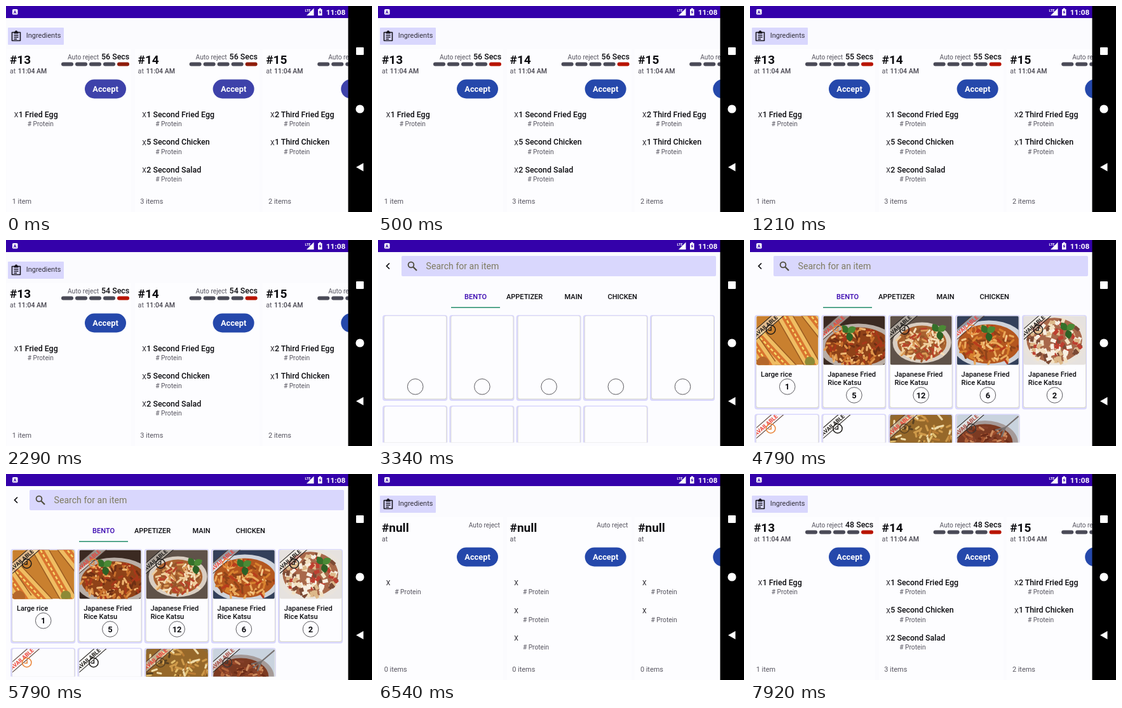
Write an HTML page that moves like this. It is 576 by 324 pixels and loops after 8000 ms.

```html
<!DOCTYPE html>
<html lang="en">
<head>
<meta charset="utf-8">
<title>Kitchen orders</title>
<style>
html, body { margin: 0; width: 100%; height: 100%; overflow: hidden; background: #000; }
svg { display: block; width: 100vw; height: 100vh; font-family: Roboto, "Open Sans", sans-serif; }
text { white-space: pre; }
</style>
</head>
<body>
<svg id="stage" viewBox="0 0 576 324" preserveAspectRatio="none"></svg>
<script>
const LOOP = 8000, OPEN = 3340, LOADED = 3690, BACK = 6540, DATA = 6600;
const BAR_ON = 3495, BAR_OFF = 4130;
const INK = '#0b0b0f', GREY = '#56545f', LILAC = '#d9d7fd';

const text = (x, y, s, size, weight = 400, fill = INK, extra = '') =>
  `<text x="${x}" y="${y}" font-size="${size}" font-weight="${weight}" fill="${fill}" ${extra}>${s}</text>`;
const rect = (x, y, w, h, fill, r = 0, extra = '') =>
  `<rect x="${x}" y="${y}" width="${w}" height="${h}" rx="${r}" fill="${fill}" ${extra}/>`;
const path = (d, fill, extra = '') => `<path d="${d}" fill="${fill}" ${extra}/>`;
const circle = (x, y, r, fill, extra = '') => `<circle cx="${x}" cy="${y}" r="${r}" fill="${fill}" ${extra}/>`;
const stroke = (d, color, w, extra = '') =>
  path(d, 'none', `stroke="${color}" stroke-width="${w}" ${extra}`);
const group = (s, attrs = '') => `<g ${attrs}>${s}</g>`;
const mid = 'text-anchor="middle"';

function randomizer(seed) {
  return () => (seed = (seed * 16807) % 2147483647) / 2147483647;
}

// ---- system bars
function chrome() {
  return rect(0, 0, 539, 19, '#3401aa') + rect(538.5, 0, 37.5, 324, '#000') +
    rect(10, 5, 8.5, 8.5, '#fff', 1.5) + text(14.2, 12, 'A', 7, 700, '#3401aa', mid) +
    text(470.5, 9, 'LTE', 5.5, 700, '#fff') + path('M473 15L484.500 3.500V15Z', '#fff') +
    path('M491 5H492.700V3.500H495.800V5H497.500V15H491Z', '#fff') +
    path('M495 6L492.300 10.300H494L493.500 13.500L496.200 9.200H494.500Z', '#3401aa') +
    text(503.8, 14, '11:08', 11.8, 700, '#fff') +
    rect(551, 65, 12, 12, '#fff', 1) + circle(557, 162, 6.6, '#fff') +
    path('M551 253.500L562.500 247V260Z', '#fff');
}

// ---- orders screen
const orders = [
  { id: 13, items: ['1 Fried Egg'] },
  { id: 14, items: ['1 Second Fried Egg', '5 Second Chicken', '2 Second Salad'] },
  { id: 15, items: ['2 Third Fried Egg', '1 Third Chicken'], shift: 7 }
];

function order(o, i, ready) {
  const n = o.items.length;
  let s = rect(1, 68, 196, 256, '#fdfdff');
  s += text(6, 90.5, ready ? '#' + o.id : '#null', 19, 700);
  s += text(6, 106, 'at', 10.7, 400, GREY);
  if (ready) {
    s += text(18.8, 106, '11:04 AM', 10.5, 500, '#44424c');
    s += text(97 + (o.shift || 0), 84, 'Auto reject', 10.2, 400, GREY);
    s += text(150 + (o.shift || 0), 83.5, '', 12.4, 500, INK, 'class="secs"');
    for (let k = 0; k < 5; k++)
      s += rect(87 + 22 * k, 88.5, 19, 6, k < 4 ? '#4a4a57' : '#b81400', 3, k < 4 ? '' : 'class="last"');
  } else {
    s += text(142.7, 84, 'Auto reject', 10.2, 400, GREY);
  }
  s += rect(124, 115.5, 65, 30, '#2548ab', 15, 'class="accept"');
  s += text(156.5, 135.3, 'Accept', 12.8, 700, '#fff', mid);
  o.items.forEach((item, k) => {
    const y = 174.5 + 43.5 * k;
    s += text(12.7, y + .5, 'X', 10.5, 400, '#25232b');
    if (ready) s += text(19.7, y, item, 12.4, 500);
    s += text(ready ? 33.7 : 26.3, y + 14.5, '# Protein', 10.2, 400, GREY);
  });
  s += text(9.7, 311, ready ? `${n} item${n > 1 ? 's' : ''}` : '0 items', 10.9, 400, GREY);
  return group(s, `transform="translate(${201.6 * i} 0)"`);
}

function ingredients() {
  const lines = 'M12.500 46H19.500M12.500 49H19.500M12.500 52H17';
  return rect(3, 34, 88, 27, LILAC, 1) +
    stroke('M9.500 41.500H22.500V54.500H9.500Z', '#19171f', 1.6, 'stroke-linejoin="round"') +
    path('M12.500 40.500H14A2 2 0 0 1 18 40.500H19.500V43.500H12.500Z', '#19171f') +
    stroke(lines, '#19171f', 1.3) + text(31.7, 50.3, 'Ingredients', 11, 400, '#35323c');
}

const ordersScreen = ready =>
  rect(0, 19, 539, 305, '#fbfbfe') + ingredients() + orders.map((o, i) => order(o, i, ready)).join('');

// ---- dishes: flat impressions made of strokes inside a plate
const RED = '#ee4038', BLACK = '#1c1a18', AMBER = '#e98235';
const fried = 'Japanese Fried|Rice Katsu';
const dishes = [
  { name: 'Large rice', n: 1, bg: '#c9802f', kind: 'buns', tag: BLACK, clock: BLACK },
  { name: fried, n: 5, bg: '#3b2a22', plate: [55, 48, 62, 36, '#b9aea6'], fill: '#8f4218', tag: RED, clock: AMBER,
    hues: ['#e0964a', '#c96f2b', '#efb672', '#a8381a', '#6f2f14'], leaf: [39, 26] },
  { name: fried, n: 12, bg: '#5f5249', plate: [50, 42, 46, 32, '#d9cec2'], fill: '#a9622f', tag: BLACK, clock: BLACK,
    hues: ['#efcd9b', '#d99a56', '#f5dfbb', '#b8442a', '#94552b'], leaf: [76, 24] },
  { name: fried, n: 6, bg: '#33405a', plate: [50, 44, 58, 37, '#cfd3da'], fill: '#b4571f', tag: RED, clock: AMBER,
    hues: ['#eaa95a', '#d8822f', '#f3c787', '#b93c1c', '#8f4419'], leaf: [48, 26] },
  { name: fried, n: 2, bg: '#e6e2df', plate: [48, 38, 52, 42, '#e9e3dc'], fill: '#a8684a', tag: BLACK, clock: BLACK,
    hues: ['#f3e2c4', '#ddb98a', '#f7efe2', '#bd3f30', '#7c4a35'], leaf: [68, 22], thick: 5.5 },
  { bg: '#fcfcfe', tag: RED, clock: AMBER },
  { bg: '#fcfcfe', tag: BLACK, clock: BLACK },
  { bg: '#6b4d24', plate: [49, 40, 75, 60, '#8a6a39'], fill: '#96682a', tag: RED, clock: '#5a4222',
    hues: ['#e2bd6c', '#b97c34', '#efdcaa', '#5a4222', '#cf9a4a'] },
  { bg: '#c9d3de', plate: [44, 44, 52, 35, '#a59a98'], fill: '#7c3a22', tag: '#a8483e', clock: '#403733',
    hues: ['#b5663c', '#9c4a2a', '#cc8a5e', '#6d2c18', '#85402a'], fork: true }
];

function buns() {
  let s = '';
  [[-22, 62, 30, 84], [6, 34, 64, 96], [44, 0, 90, 80], [72, -18, 124, 48], [-20, 20, 20, 78]].forEach(([a, b, c, d]) => {
    const line = `M${a} ${b}L${c} ${d}`;
    s += stroke(line, '#9a5920', 25) + stroke(line, '#efbd62', 22, 'stroke-linecap="round"') +
      stroke(line, '#d9742f', 10, 'stroke-linecap="round"') +
      stroke(line, '#f6d968', 2.5, 'stroke-dasharray="5 3"');
  });
  return s + circle(10, 74, 10, '#b5672a') + circle(84, 72, 8, '#8d8a36');
}

function pasta(d, seed) {
  const [cx, cy, rx, ry, rim] = d.plate, rnd = randomizer(seed * 991 + 77);
  const ell = (k, fill) => `<ellipse cx="${cx}" cy="${cy}" rx="${rx * k}" ry="${ry * k}" fill="${fill}"/>`;
  const xy = (x, y) => `${x.toFixed(1)} ${y.toFixed(1)}`;
  let s = ell(1, rim) + ell(.84, d.fill);
  for (let k = 0; k < 120; k++) {
    const a = rnd() * 6.283, r = Math.sqrt(rnd()) * .8, b = rnd() * 3.14;
    const len = d.thick ? 3 : 4 + rnd() * 6;
    const line = `M${xy(cx + Math.cos(a) * r * rx, cy + Math.sin(a) * r * ry)}l${xy(Math.cos(b) * len, Math.sin(b) * len)}`;
    s += stroke(line, d.hues[Math.floor(rnd() * d.hues.length)], d.thick || 3.2,
      `stroke-linecap="${d.thick ? 'square' : 'round'}"`);
  }
  if (d.leaf) {
    const leaf = (turn, c) => path('M0 0C-9 -5 -8 -13 2 -17C9 -10 7 -4 0 0Z', c, `transform="rotate(${turn})"`);
    s += group(leaf(-45, '#35702a') + leaf(50, '#4b8a35') + leaf(160, '#2d6125'),
      `transform="translate(${d.leaf}) scale(.85)"`);
  }
  if (d.fork) s += stroke('M97 2L76 20M76 20L60 24M76 20L63 30M76 20L70 35', '#76706f', 2.2);
  return s;
}

function ribbon(d) {
  const edges = 'M-40 -6H70M-40 6.500H70';
  return group(rect(-40, -6, 110, 12.5, '#f5f1ea', 0, 'opacity=".5"') + stroke(edges, d.tag === RED ? '#4a3029' : BLACK, 1) +
    text(0, 3.6, 'AVAILABLE', 8.8, 700, d.tag, mid), 'transform="translate(14.500 15.500) rotate(-41)"') +
    circle(22.5, 21.5, 7.2, 'none', `stroke="${d.clock}" stroke-width="1.5"`) +
    stroke('M23 17.500V22.500H18.500', d.clock, 1.5);
}

function photo(d, i) {
  let s = rect(0, 0, 97, 77, d.bg);
  if (d.kind === 'buns') s += buns();
  if (d.plate) s += pasta(d, i + 1);
  if (d.tag) s += ribbon(d);
  return group(group(s, 'clip-path="url(#photo)"'), 'transform="translate(3 1.500)"');
}

// ---- menu screen
function card(d, i, ready) {
  const x = 7.2 + 105.2 * (i % 5), h = ready ? 148.5 : 135;
  const y = 118 + (i > 4 ? (ready ? 155.5 : 142.5) : 0);
  let s = rect(0, 0, 102, h, LILAC, 4) + rect(2.3, 1.5, 98.5, h - 4, '#dcdccb', 3) +
    rect(3, 1.5, 97, h - 5, '#fdfdff', 3);
  let cy = 112.7;
  if (ready) {
    s += photo(d, i);
    if (d.name) {
      const lines = d.name.split('|');
      lines.forEach((l, k) => s += text(9.8, 97 + 13 * k, l, 11.1, 500));
      cy += 13.3 * (lines.length - 1);
    }
  }
  s += circle(51.5, cy, 12.3, 'none', 'stroke="#4b4a50" stroke-width=".9"');
  if (ready && d.n) s += text(51.5, cy + 4.6, d.n, 12.8, 700, INK, mid);
  return group(s, `transform="translate(${x} ${y})"`);
}

const cards = ready => dishes.map((d, i) => card(d, i, ready)).join('');

function menuTop() {
  const tabs = ['BENTO', 'APPETIZER', 'MAIN', 'CHICKEN'];
  return stroke('M18 36.500L13.500 41L18 45.500', INK, 1.7) + rect(37, 25, 495, 32, LILAC, 2) +
    circle(52, 39, 4.4, 'none', 'stroke="#4f4d3d" stroke-width="1.8"') + stroke('M55.500 42.500L61 48', '#4f4d3d', 2.2) +
    text(75.6, 46.3, 'Search for an item', 14.1, 400, '#7f7c62') +
    tabs.map((t, i) => text(153.6 + 77 * i, 92.5, t, 11, 500, i ? INK : '#3906b0', mid)).join('') +
    rect(115, 105.5, 77, 1.4, '#138560');
}

const stage = document.getElementById('stage');
stage.innerHTML =
  `<defs><clipPath id="photo"><rect width="97" height="77" rx="3"/></clipPath>
  <clipPath id="list"><rect y="110" width="539" height="208.500"/></clipPath></defs>` +
  group(ordersScreen(true), 'id="ready"') + group(ordersScreen(false), 'id="blank"') +
  group(rect(0, 19, 539, 305, '#fcfcff') + menuTop() +
    group(rect(0, 62, 539, 2.5, '#c3d9d6') + rect(0, 62, 0, 2.5, '#10984c', 0, 'id="run"'), 'id="bar"') +
    group(group(cards(false), 'id="empty"') + group(cards(true), 'id="full"'), 'clip-path="url(#list)"'), 'id="menu"') +
  chrome();

const el = id => document.getElementById(id);
const [ready, blank, menu, bar, run, empty, full] =
  ['ready', 'blank', 'menu', 'bar', 'run', 'empty', 'full'].map(el);
const secs = stage.querySelectorAll('.secs');
const lasts = stage.querySelectorAll('.last');
const accepts = ready.querySelectorAll('.accept');
const show = (node, on) => node.setAttribute('display', on ? 'inline' : 'none');
const blend = (a, b, k) => `rgb(${a.map((v, i) => Math.round(v + (b[i] - v) * k))})`;

function draw(t) {
  const inMenu = t >= OPEN && t < BACK, isBlank = t >= BACK && t < DATA;
  show(menu, inMenu);
  show(blank, isBlank);
  show(ready, !inMenu && !isBlank);
  show(empty, t < LOADED);
  show(full, t >= LOADED);

  const left = 56 - Math.floor((t + 120) / 1000);
  secs.forEach(s => s.textContent = left + ' Secs');
  const k = Math.min(1, t / 400);
  lasts.forEach(s => s.setAttribute('fill', blend([143, 28, 10], [184, 20, 0], k)));
  accepts.forEach(s => s.setAttribute('fill', blend([62, 66, 170], [37, 72, 171], k)));

  show(bar, t >= BAR_ON && t < BAR_OFF);
  const u = Math.max(0, (t - BAR_ON) / 385);
  const c = -26 + 146.5 * u ** 1.21, w = 43 + 108 * u;
  const x0 = Math.max(0, c - w / 2), x1 = Math.min(539, c + w / 2);
  run.setAttribute('x', x0);
  run.setAttribute('width', Math.max(0, x1 - x0));
}

const start = performance.now();
function frame() {
  draw((performance.now() - start) % LOOP);
  requestAnimationFrame(frame);
}
frame();
</script>
</body>
</html>
```
